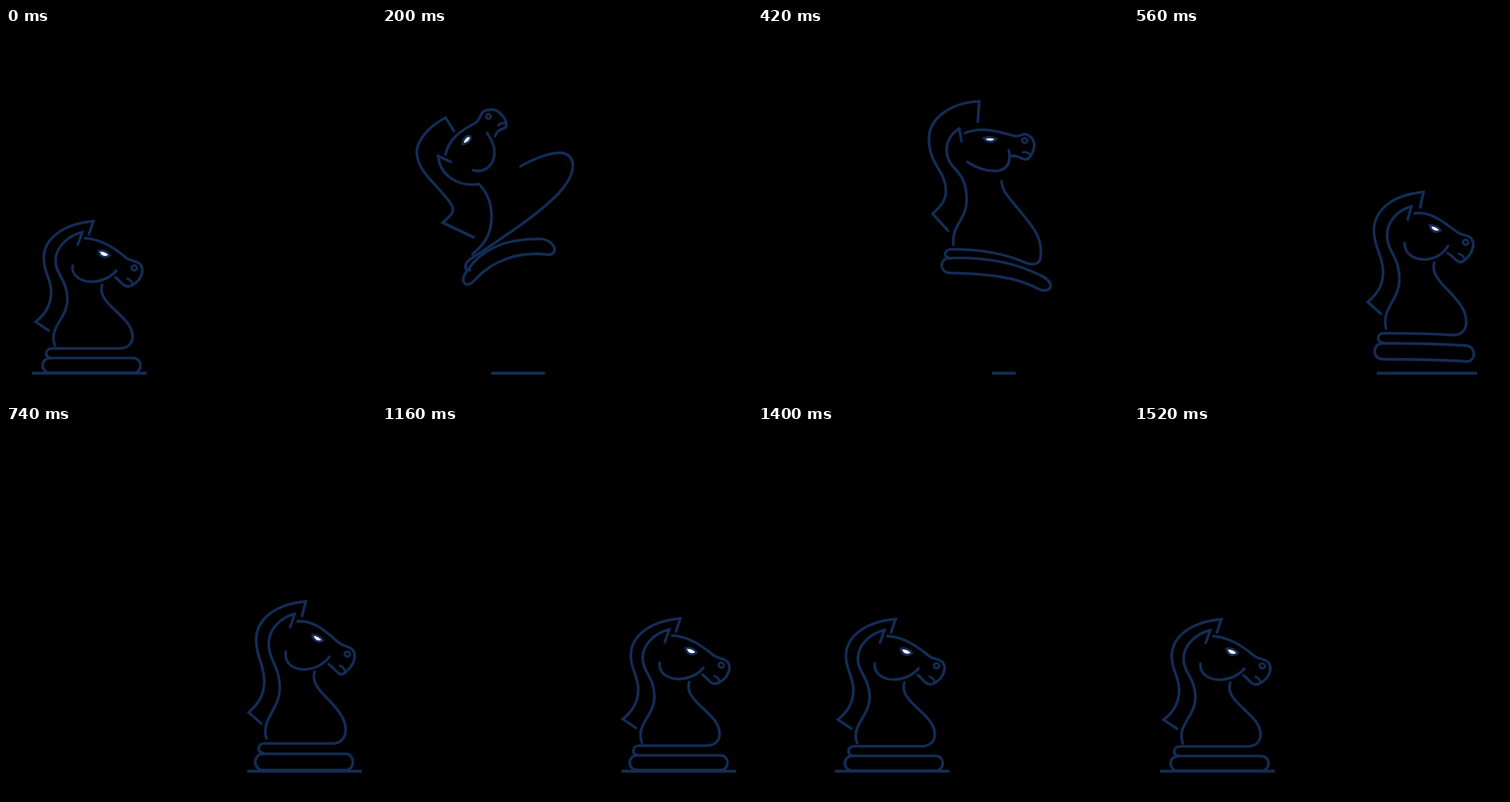
An HTML page for the animation above (1.6 s loop, 500 px wide and 500 px high).

```html
<!DOCTYPE html>
<html lang="en">
<head>
<meta charset="utf-8">
<title>Leaping knight</title>
<style>
  html, body { margin: 0; width: 100%; height: 100%; overflow: hidden; background: #000; }
  svg { display: block; width: 100%; height: 100%; }
  path { fill: none; stroke: #142d57; stroke-width: 3.6; stroke-linecap: round; }
  #eye { fill: #fff; stroke-width: 3; }
  #nostril, #mouth { stroke-width: 3; }
  #ground { stroke-width: 4; stroke-linecap: butt; }
</style>
</head>
<body>
<svg viewBox="0 0 500 500">
  <path id="ground"/>
  <g id="knight"></g>
</svg>
<script>
const LOOP = 1600, STEP = 20;
const LEAP_END = 620, SETTLED = 740, SLIDE_START = 1140, SLIDE_END = 1520;
const KNIGHT_TRAVEL = 287.5, GROUND_TRAVEL = 291;

// Each part in four poses: standing, taking off, falling, rebounding.
const PARTS = {
  mane: [
    'M112 279 L118 261 C75 265 51 286 51 311 C51 331 61 338 61 357 C61 375 53 387 40 397 L58 409',
    'M97 139 L86 121 C63 133 47 152 47 168 C47 196 82 217 95 241 C98 248 94 253 82 263 L124 283',
    'M297 127 L299 99 C260 101 231 122 231 150 C231 185 254 193 254 220 C254 233 247 241 236 251 L257 274',
    'M400 257 L405 237 C362 241 338 262 338 290 C338 312 349 322 349 345 C349 364 341 375 328 387 L345 402'
  ],
  neck: [
    'M97 293 L103 276 C83 281 67 296 67 315 C67 333 83 341 83 367 C83 393 57 404 66 429',
    'M93 181 L76 173 C78 198 101 215 131 211 C142 222 148 237 148 255 C148 278 139 292 122 306',
    'M275 153 L272 136 C260 143 254 155 255 168 C257 193 282 190 282 232 C282 260 262 264 264 293',
    'M384 272 L390 254 C370 259 355 275 355 295 C355 316 370 325 370 354 C370 383 344 396 352 422'
  ],
  head: [
    'M107 284 C130 286 146 297 163 311 C170 316 177 314 182 320 C186 326 184 334 179 341 C173 347 168 350 163 349 C157 348 156 343 148 337',
    'M86 171 C90 150 106 139 125 129 C135 123 131 117 137 113 C144 109 155 109 159 115 C164 119 168 125 168 130 C169 139 157 133 153 146',
    'M280 142 C303 132 327 141 347 146 C356 147 360 140 367 146 C373 150 374 157 373 162 C371 171 365 180 359 177 C352 175 351 172 343 173',
    'M394 264 C418 262 434 280 450 293 C457 299 464 297 469 303 C473 310 471 318 466 325 C460 332 456 337 451 335 C446 333 443 326 436 322'
  ],
  mouth: [
    'M164 339 C168 340 170 343 171 346',
    'M157 132 C159 129 163 128 167 129',
    'M358 168 C363 167 367 169 369 173',
    'M451 324 C455 325 457 328 458 331'
  ],
  jaw: [
    'M90 321 C88 336 103 343 116 343 C132 342 143 335 149 328',
    'M123 192 C140 197 152 184 152 168 C152 157 147 149 142 142',
    'M283 181 C298 191 313 194 325 193 C338 190 342 180 339 165',
    'M378 305 C376 322 389 329 404 329 C419 328 430 321 437 312'
  ],
  eye: [
    'M125 301 C132 300 138 303 140 307 C136 311 127 311 125 301 Z',
    'M109 157 C109 150 114 145 119 146 C122 150 117 156 109 157 Z',
    'M305 149 C310 147 317 147 322 150 C318 155 309 155 305 149 Z',
    'M414 282 C420 282 426 285 428 290 C423 293 415 291 414 282 Z'
  ],
  nostril: [
    'M176 322 C173 319 169 322 170 325 C171 329 177 328 177 324',
    'M141 118 C140 122 143 124 146 122 C149 119 145 115 142 117',
    'M363 150 C360 147 356 150 357 153 C359 157 364 155 364 152',
    'M464 306 C461 303 457 306 458 309 C459 313 465 312 465 308'
  ],
  chest: [
    'M130 347 C126 359 134 369 146 380 C160 393 171 403 171 417 C171 427 164 433 153 433 C122 433 92 433 62 433 C52 433 52 446 61 446',
    'M187 187 C208 175 235 165 248 170 C262 176 260 193 250 209 C235 233 197 260 169 279 C150 292 133 304 118 313 C110 320 112 330 119 327',
    'M329 207 C330 222 343 233 352 245 C370 267 385 282 382 309 C381 320 371 321 361 317 C330 303 295 299 262 299 C250 299 250 311 260 311',
    'M417 332 C413 345 421 355 433 367 C449 383 459 396 459 410 C459 422 452 429 441 429 C410 429 380 429 349 429 C339 429 339 442 348 442'
  ],
  base: [
    'M60 446 C98 446 135 446 172 446 C185 446 185 466 172 466 C135 466 98 466 60 466 C46 466 46 446 60 446 Z',
    'M115 328 C133 301 165 284 213 285 C236 286 240 309 222 306 C187 302 150 313 126 340 C112 355 104 341 115 328 Z',
    'M258 311 C305 309 346 316 381 334 C400 341 400 358 382 354 C350 336 310 332 259 331 C245 331 245 311 258 311 Z',
    'M348 443 C385 443 422 443 459 443 C472 443 472 465 459 465 C422 465 385 465 348 465 C333 465 333 443 348 443 Z'
  ]
};

const KEY_TIMES = [0, 200, 310, 420, 540, 630, SETTLED];
const clamp = v => Math.min(1, Math.max(0, v));
const ease = (t, from, to) => { const s = clamp((t - from) / (to - from)); return s * s * (3 - 2 * s); };
const mix = (a, b, k) => a.map((v, i) => v + (b[i] - v) * k);
const shift = (pose, dx, dy) => pose.map((v, i) => v + (i % 2 ? dy : dx));
const numbers = path => path.match(/[\d.]+/g).map(Number);

const knight = document.getElementById('knight');
const ground = document.getElementById('ground');
const parts = Object.entries(PARTS).map(([id, paths]) => {
  const [rest, takeoff, fall, rebound] = paths.map(numbers);
  const node = document.createElementNS('http://www.w3.org/2000/svg', 'path');
  node.id = id;
  knight.append(node);
  const apex = shift(mix(takeoff, fall, 0.5), 0, -105);
  const touchdown = mix(shift(rest, KNIGHT_TRAVEL, -1), rebound, 0.4);
  const keys = [rest, takeoff, apex, fall, mix(fall, rebound, 0.79), touchdown, rebound];
  return { node, template: paths[0], rest, keys };
});

function slope(keys, k, i) {
  if (k === 0 || k === keys.length - 1) return 0;
  return (keys[k + 1][i] - keys[k - 1][i]) / (KEY_TIMES[k + 1] - KEY_TIMES[k - 1]);
}

// Cubic Hermite blend through the key poses.
function poseAt(keys, t) {
  if (t >= SETTLED) return keys[keys.length - 1];
  const k = KEY_TIMES.findIndex(time => time > t) - 1;
  const span = KEY_TIMES[k + 1] - KEY_TIMES[k];
  const s = (t - KEY_TIMES[k]) / span, r = 1 - s;
  return keys[k].map((v, i) =>
    v * r * r * (1 + 2 * s) + keys[k + 1][i] * s * s * (3 - 2 * s) +
    span * s * r * (slope(keys, k, i) * r - slope(keys, k + 1, i) * s));
}

function draw(t) {
  const sliding = t > SLIDE_START;
  const remaining = 1 - ease(t, SLIDE_START, SLIDE_END);

  for (const { node, template, rest, keys } of parts) {
    const pose = sliding ? rest : poseAt(keys, t);
    let i = 0;
    node.setAttribute('d', template.replace(/[\d.]+/g, () => pose[i++].toFixed(2)));
  }
  knight.setAttribute('transform',
    sliding ? `translate(${KNIGHT_TRAVEL * remaining} ${-remaining})` : '');

  const progress = sliding ? remaining : ease(t, 0, LEAP_END);
  const center = 112.5 + GROUND_TRAVEL * progress;
  const half = (155 - 142 * (ease(t, 0, 360) - ease(t, 360, LEAP_END))) / 2;
  ground.setAttribute('d', `M${center - half} 466.5 H${center + half}`);
}

const start = performance.now();
function tick() {
  const t = (performance.now() - start) % LOOP;
  draw(Math.floor(t / STEP) * STEP);
  requestAnimationFrame(tick);
}
tick();
</script>
</body>
</html>
```
